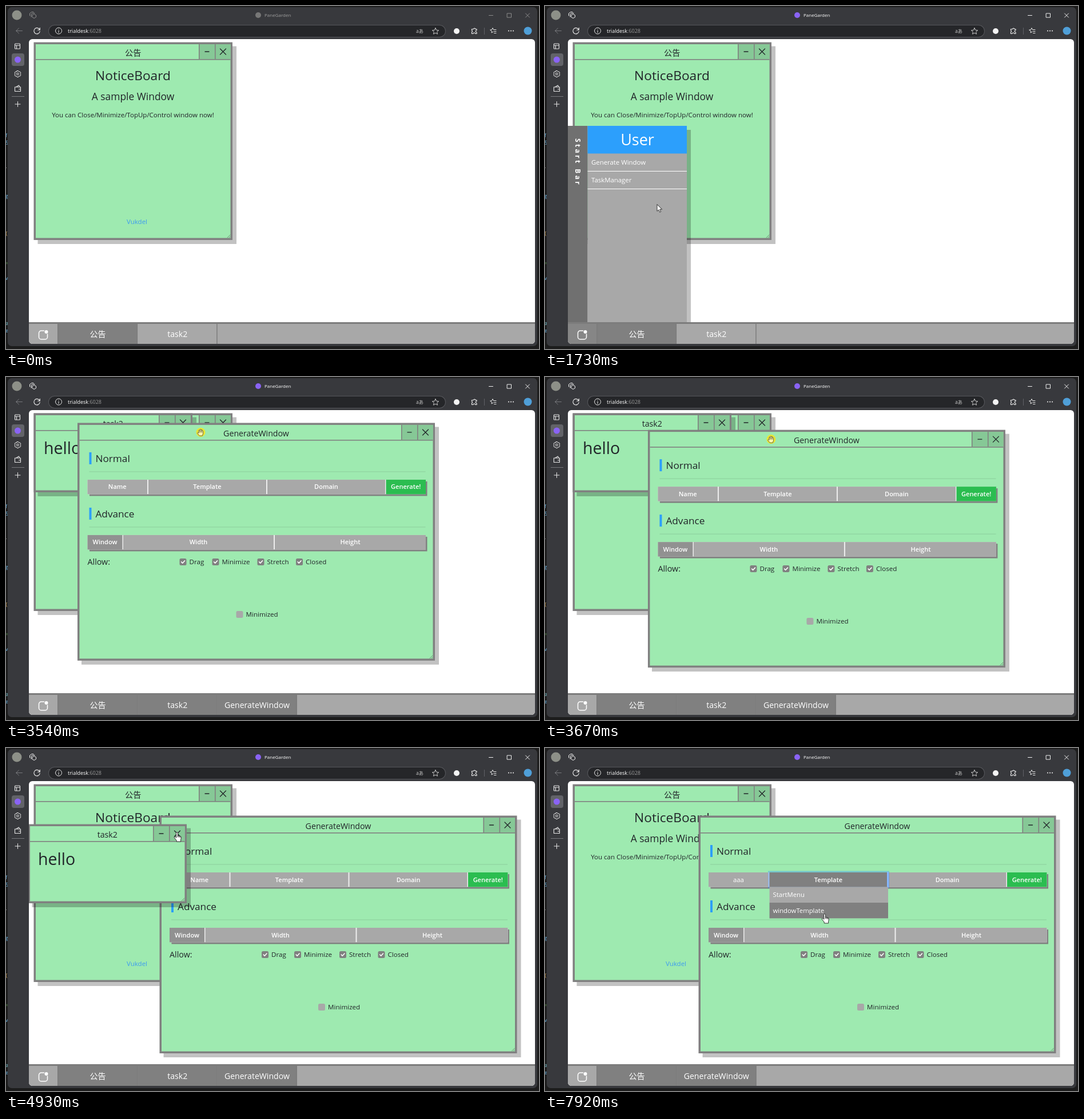
An HTML page with a canvas for the animation above (8000 ms loop, 932 by 601 pixels).

```html
<!DOCTYPE html>
<html lang="en">
<head>
<meta charset="utf-8">
<style>
html, body { margin: 0; width: 100%; height: 100%; overflow: hidden; background: #1c1c1c; }
canvas { display: block; }
</style>
</head>
<body>
<canvas id="stage" width="932" height="601"></canvas>
<script>
const ctx = document.getElementById('stage').getContext('2d');
const LOOP = 8000;
const SANS = '"Open Sans", "Noto Sans CJK SC", "Noto Sans CJK", sans-serif';
const GREEN = '#9eeab0', DARK = '#808080', GREY = '#a8a8a8', BLUE = '#2c9ffc';
const INK = '#212529', SHADE = 'rgba(0,0,0,.24)', CHROME = '#38393d';

// Key moments in ms
const MENU_OPEN = 990, MENU_CLICK = 2080, TASK_CLICK = 2890, TASK_CLOSE = 4970;
const NAME_FOCUS = 5500, LIST_OPEN = 7000;

// Pointer track: time, x, y, shape used from that time on
const track = [
  [130, 918, 585, 'arrow'], [250, 800, 540, 'arrow'], [500, 500, 508, 'arrow'],
  [780, 240, 558, 'hand'], [900, 88, 572, 'hand'], [960, 66, 570, 'hand'],
  [1060, 66, 570, 'hand'], [1250, 150, 400, 'arrow'], [1400, 221, 268, 'hand'],
  [1560, 221, 268, 'hand'], [1640, 208, 315, 'arrow'], [1710, 196, 348, 'arrow'],
  [1760, 196, 348, 'arrow'], [1830, 172, 288, 'hand'], [1890, 160, 268, 'hand'],
  [2080, 160, 268, 'arrow'], [2540, 262, 558, 'hand'], [2630, 285, 566, 'hand'],
  [2820, 290, 579, 'hand'], [2920, 290, 579, 'arrow'], [3300, 264, 80, 'arrow'],
  [3360, 264, 80, 'grab'], [3670, 395, 109, 'grab'], [3880, 484, 135, 'arrow'],
  [4180, 214, 93, 'grab'], [4230, 214, 93, 'grab'], [4280, 212, 98, 'grab'],
  [4480, 204, 163, 'grab'], [4520, 204, 163, 'arrow'], [4800, 299, 148, 'hand'],
  [5050, 299, 148, 'arrow'], [5340, 300, 219, 'beam'], [5480, 338, 230, 'beam'],
  [5600, 338, 230, 'beam'], [5850, 400, 231, 'beam'], [6600, 400, 231, 'beam'],
  [6950, 490, 232, 'beam'], [7360, 490, 232, 'beam'], [7480, 490, 246, 'hand'],
  [7920, 489, 291, 'hand']
];

const clamp = (v, a, b) => Math.min(b, Math.max(a, v));

function pointer(t) {
  let i = track.length - 1;
  while (i > 0 && track[i][0] > t) i--;
  const a = track[i], b = track[i + 1] || a;
  const k = b === a ? 0 : clamp((t - a[0]) / (b[0] - a[0]), 0, 1);
  return { x: a[1] + (b[1] - a[1]) * k, y: a[2] + (b[2] - a[2]) * k, shape: a[3] };
}

function rect(x, y, w, h, fill) {
  ctx.fillStyle = fill;
  ctx.fillRect(x, y, w, h);
}

function round(x, y, w, h, r, fill) {
  ctx.beginPath();
  ctx.roundRect(x, y, w, h, r);
  ctx.fillStyle = fill;
  ctx.fill();
}

function dot(x, y, r, fill) {
  ctx.beginPath();
  ctx.arc(x, y, r, 0, 7);
  ctx.fillStyle = fill;
  ctx.fill();
}

function text(s, x, y, size, color = INK, align = 'left', weight = 400) {
  ctx.font = `${weight} ${size}px ${SANS}`;
  ctx.textAlign = align;
  ctx.fillStyle = color;
  ctx.fillText(s, x, y);
}

function icon(x, y, d, stroke, width = 1, fill) {
  const p = new Path2D(d);
  ctx.save();
  ctx.translate(x, y);
  ctx.lineJoin = ctx.lineCap = 'round';
  if (fill) { ctx.fillStyle = fill; ctx.fill(p); }
  if (stroke) { ctx.strokeStyle = stroke; ctx.lineWidth = width; ctx.stroke(p); }
  ctx.restore();
}

const CROSS = 'M-5-5L5 5M5-5L-5 5';
const STAR = 'M0-5.5L1.7-1.8 5.6-1.4 2.7 1.3 3.5 5.2 0 3.2-3.5 5.2-2.7 1.3-5.6-1.4-1.7-1.8Z';

function browser(active) {
  const lit = active ? '#f0f0f0' : '#8c8c8c', w = '#e6e6e6';
  rect(0, 0, 932, 601, '#1c1c1c');
  [['f', 230, '#6cb8e8'], ['5', 243, '#6cb8e8'], ['.', 284, '#ccc'], ['g', 336, '#6cb8e8'],
   ['{', 402, '#d9a860'], ['=', 454, '#5d9a50'], ['v', 480, '#6cb8e8'],
   ['a', 559, '#7ccbd8'], ['e', 572, '#6cb8e8']].forEach(([s, y, c]) => text(s, -1, y, 9, c));
  round(3, 2, 926, 594, 7, CHROME);

  // Title row
  dot(19, 16, 8.5, '#8d9088');
  icon(47, 16, 'M-5.5 1V-3L-2-5.5H1M-3 3V-1.5L0-3.5H3M-1 0L2-2 5.5 0V3.5L2 5.5-1 3.5Z', lit);
  dot(441, 16, 5, active ? '#8a63f5' : '#777');
  text('PaneGarden', 452, 19, 8, active ? '#fff' : '#a0a0a0');
  icon(848, 16.5, 'M-3.5 0H3.5', lit);
  icon(880, 16.5, 'M-3.5-3.5H3.5V3.5H-3.5Z', lit);
  icon(912, 16.5, 'M-3.5-3.5L3.5 3.5M3.5-3.5L-3.5 3.5', lit);

  // Address row
  icon(23, 43.5, 'M5.5 0H-5.5M-.5-4.5L-5.5 0-.5 4.5', '#77787c');
  icon(54, 43.5, 'M5-1.5A5.2 5.2 0 1 0 5.2 1M5.3-5.2V-1.5H1.6', w, 1.2);
  round(74, 33, 695, 22, 11, '#55565a');
  round(75, 34, 693, 20, 10, '#252629');
  icon(92, 43.5, 'M-5.5 0A5.5 5.5 0 1 1 5.5 0A5.5 5.5 0 1 1-5.5 0M0-.5V3M0-2.6V-2.5', w);
  text('trialdesk', 108, 47, 9, '#fff');
  const hostWidth = ctx.measureText('trialdesk').width;
  text(':6028', 108 + hostWidth, 47, 9, '#9a9a9a');
  text('aあ', 723.5, 47, 8.5, '#c8c8c8', 'center');
  icon(751, 44, STAR, '#c8c8c8');
  dot(788, 44, 5, '#f4f4f4');
  icon(819, 44, 'M-4.5-3.5H-1.5A1.8 1.8 0 0 1 2-3.5H4V-1.5A1.6 1.6 0 0 0 4 2V4.5H1.5A1.7 1.7 0 0 0-2 4.5H-4.5V1.7A1.7 1.7 0 0 0-4.5-1.4Z', w, 1.2);
  rect(836, 38, 1, 12, '#606166');
  icon(851, 43, 'M1 2L-2 4-1.5 1-4.5-1-1.5-1.5 0-4.5 1.5-1.5H6M2.5 1.5H6M2.5 4.5H6', w);
  [-4, 0, 4].forEach(d => dot(883 + d, 43.5, 1.1, w));
  dot(912.5, 43.5, 7, '#4f9fd8');

  // Side column
  icon(20, 70.5, 'M-4.5-3.5A1 1 0 0 1-3.5-4.5H3.5A1 1 0 0 1 4.5-3.5V3.5A1 1 0 0 1 3.5 4.5H-3.5A1 1 0 0 1-4.5 3.5ZM-1.5-1.5V4.5M-4.5-1.5H4.5', w, 1.1);
  round(10, 83, 22, 22, 4, '#626368');
  dot(20.5, 94, 5.5, '#8a63f5');
  icon(20.5, 119, 'M-1.2-5.5H1.2L2-3.8 4-4 5.4-1.8 4.4 0 5.4 1.8 4 4 2 3.8 1.2 5.5H-1.2L-2 3.8-4 4-5.4 1.8-4.4 0-5.4-1.8-4-4-2-3.8ZM-1.8 0A1.8 1.8 0 1 1 1.8 0A1.8 1.8 0 1 1-1.8 0', w);
  icon(20.5, 144.5, 'M-5-2.5H5V5H-5ZM-3-2.5L2-5.5 3.5-2.5M2 1.2H5', w, 1.1);
  rect(10, 158, 22, 1, '#77787c');
  icon(20.5, 172, 'M-4.5 0H4.5M0-4.5V4.5', w);

  round(40, 58, 885, 534, 6, '#fff');
}

function frame(w, h, title) {
  const x = 48.5, y = 63.5, right = x + w;
  rect(x + 7, y + 7, w, h, SHADE);
  rect(x, y, w, h, DARK);
  rect(x + 3.5, y + 3.5, w - 7, h - 7, GREEN);
  rect(right - 59, y + 3.5, 55.5, 26, '#86c896');
  rect(x + 3.5, y + 29.5, w - 7, 1.6, DARK);
  rect(right - 59, y + 3.5, 1.6, 26, DARK);
  rect(right - 31, y + 3.5, 1.6, 26, DARK);
  icon(right - 44.5, y + 16.5, 'M-3.5 0H3.5', INK, 1.3);
  icon(right - 16.5, y + 16.5, CROSS, INK, 1.3);
  text(title, x + w / 2, y + 23.5, 14.2, INK, 'center');
  icon(right - 4, y + h - 4, 'M-5 0L0-5M-2 0L0-2', '#5f7f68', .8);
}

function notice() {
  frame(347.5, 346.5, '公告');
  text('NoticeBoard', 222, 130, 22.7, INK, 'center');
  text('A sample Window', 222, 165, 17.4, INK, 'center');
  text('You can Close/Minimize/TopUp/Control window now!', 222, 195, 11.53, INK, 'center');
  text('Vukdel', 229, 382, 11.5, '#3d9bf0', 'center');
}

function hello() {
  frame(277.5, 138.5, 'task2');
  text('hello', 66, 135, 28.5);
}

function heading(s, y) {
  rect(69, y - 17, 4, 21, BLUE);
  text(s, 80, y, 17.2);
  rect(69, y + 16.5, 588, 1, 'rgba(33,37,41,.14)');
}

function cell(s, x, w, y, fill = GREY) {
  rect(x, y, w, 25.5, fill);
  if (s) text(s, x + w / 2, y + 16.5, 11, '#fff', 'center', 600);
}

function rowBase(y) {
  rect(69.5, y + 3, 590.5, 25.5, DARK);
  rect(66, y, 591.5, 25.5, '#eee');
}

function focusRing(x, y, w) {
  rect(x - 2.5, y - 2.5, w + 5, 30.5, 'rgba(40,130,255,.35)');
  rect(x, y, w, 25.5, DARK);
  rect(x + w - 1.5, y - 1, 3, 27.5, '#86b7fe');
}

function check(label, x, y, on) {
  round(x, y, 12, 12, 2.5, on ? DARK : GREY);
  if (on) icon(x + 6, y + 6, 'M-2.8 0L-.8 2.2 3-2', '#fff', 1.6);
  text(label, x + 17, y + 10, 11.6);
}

function generator(t, mouse) {
  frame(625, 416.5, 'GenerateWindow');
  const typed = t < 6150 ? '' : t < 6310 ? 'a' : t < 6480 ? 'aa' : 'aaa';
  const onName = t >= NAME_FOCUS && t < LIST_OPEN, onList = t >= LIST_OPEN;

  heading('Normal', 132);
  rowBase(163);
  cell(typed ? '' : 'Name', 66, 104.5, 163);
  cell('Template', 172.5, 206, 163);
  cell('Domain', 380.5, 206, 163);
  cell('Generate!', 588, 69.5, 163, '#2bbd50');
  if (onName) {
    focusRing(66, 163, 105.5);
    if (!typed) text('Name', 118.3, 179.5, 11, '#fff', 'center', 600);
  }
  if (typed) {
    text(typed, 118.3, 179.5, 11.3, '#fff', 'center', 500);
    if (onName) rect(118.8 + ctx.measureText(typed).width / 2, 169, 1, 13, '#fff');
  }

  heading('Advance', 229);
  rowBase(260);
  cell('Window', 66, 61, 260, '#919191');
  cell('Width', 128.5, 263, 260);
  cell('Height', 393.5, 264, 260);

  text('Allow:', 66, 312, 14.3);
  check('Drag', 227, 301, true);
  check('Minimize', 284, 301, true);
  check('Stretch', 363, 301, true);
  check('Closed', 430.5, 301, true);
  check('Minimized', 326, 393, false);

  if (onList) {
    focusRing(172.5, 163, 207);
    text('Template', 275.5, 179.5, 11, '#fff', 'center', 600);
    ['StartMenu', 'windowTemplate'].forEach((s, i) => {
      const y = 188.5 + i * 27.5;
      const over = mouse.y - 55 >= y && mouse.y - 55 < y + 27.5;
      rect(172.5, y, 207.5, 27.5, over ? DARK : GREY);
      text(s, 178.5, y + 17.5, 11.3, '#fff', 'left', 500);
    });
  }
}

function at(dx, dy, draw) {
  ctx.save();
  ctx.translate(dx, dy);
  draw();
  ctx.restore();
}

function taskbar(t) {
  const menu = t >= MENU_OPEN && t < MENU_CLICK;
  ctx.save();
  ctx.beginPath();
  ctx.roundRect(40, 554, 885, 38, [0, 0, 6, 6]);
  ctx.clip();
  rect(40, 554, 885, 38, GREY);
  rect(40, 554, 885, 3, '#7c7c7c');
  if (menu || (t > 930 && t < MENU_OPEN)) rect(40, 557, 51, 35, '#868686');
  const hover = clamp((t - 2590) / 220, 0, 1);
  const mix = Math.round(168 - 40 * hover);
  const tasks = [['公告', DARK]];
  if (t < TASK_CLOSE) tasks.push(['task2', `rgb(${mix},${mix},${mix})`]);
  if (t >= MENU_CLICK) tasks.push(['GenerateWindow', DARK]);
  tasks.forEach(([s, fill], i) => {
    const x = 91 + i * 139.2;
    rect(x, 557, 139.2, 35, fill);
    rect(x + 138, 557, 1.4, 35, '#7a7a7a');
    text(s, x + 69.5, 579.5, 14.1, '#fff', 'center', 500);
  });
  rect(90, 557, 1.4, 35, '#7a7a7a');
  icon(65, 576, 'M1.5-7H-3.5A4 4 0 0 0-7.5-3V4A4 4 0 0 0-3.5 8H3.5A4 4 0 0 0 7.5 4V-1', '#fff', 1.5);
  dot(70.5, 571, 3, '#fff');
  ctx.restore();
}

function startMenu(mouse) {
  rect(47, 217, 208, 337, SHADE);
  rect(40, 210, 34.5, 344, '#707070');
  rect(74.5, 210, 173.5, 344, GREY);
  rect(74.5, 210, 173.5, 48.5, BLUE);
  text('User', 161.5, 244, 27, '#fff', 'center');
  ['Generate Window', 'TaskManager'].forEach((s, i) => {
    const y = 259 + i * 31;
    if (mouse.x > 74 && mouse.x < 248 && mouse.y > y && mouse.y < y + 30) rect(74.5, y, 173.5, 30, '#8c8c8c');
    text(s, 81, y + 19, 11.4, '#fff', 'left', 500);
    rect(74.5, y + 30, 173.5, 1, '#fff');
  });
  ctx.save();
  ctx.translate(53, 232);
  ctx.rotate(Math.PI / 2);
  ctx.letterSpacing = '3.4px';
  text('Start Bar', 0, 0, 12, '#fff', 'left', 700);
  ctx.restore();
}

function drawPointer({ x, y, shape }) {
  if (shape === 'arrow') {
    icon(x, y, 'M0 0V11.5L2.7 9 4.6 13.3 6.6 12.4 4.7 8.2H8.2Z', '#222', .9, '#fff');
  } else if (shape === 'hand') {
    icon(x, y, 'M-1.4 1A1.4 1.4 0 0 1 1.4 1V5.5L6 6.6Q7.6 7 7.4 9L6.6 13V16H-.8V14L-4.6 9.2Q-5.2 7.2-3.4 7.4L-1.4 9ZM1.4 5.5V8M3.7 6.2V8.4M5.8 6.8V8.8', '#222', .9, '#fff');
  } else if (shape === 'grab') {
    dot(x, y, 8, 'rgba(240,228,40,.9)');
    icon(x, y, 'M-3.6 1V-3.2Q-2.7-4.6-1.8-3.2V-4.6Q-.8-6 .2-4.6Q1.2-5.6 2.1-4V-3Q3.2-4 4.1-2.4V2.2L2.8 6H-2.2L-6 1.4Q-5.6-.4-3.6 1M-1.8-3.2V0M.2-4.6V0M2.1-4V0', '#4c4820', .8, '#fff8b0');
  } else {
    icon(x, y, 'M-2.5-6H-.6L0-5.4 .6-6H2.5M0-5.4V5.4M-2.5 6H-.6L0 5.4 .6 6H2.5', '#444', 1);
  }
}

function draw(t) {
  const mouse = pointer(t);
  browser(t >= 960);
  ctx.save();
  ctx.beginPath();
  ctx.rect(40, 58, 885, 496);
  ctx.clip();
  notice();

  const g = pointer(clamp(t, 3360, 3880)), h = pointer(clamp(t, 4230, 4480));
  const showGen = () => t >= MENU_CLICK && at(g.x - 264, g.y - 80, () => generator(t, mouse));
  const showHello = () => t >= TASK_CLICK && t < TASK_CLOSE && at(h.x - 214, h.y - 93, hello);
  // A grabbed window comes to the front
  (t < 4200 ? [showHello, showGen] : [showGen, showHello]).forEach(show => show());

  if (t >= MENU_OPEN && t < MENU_CLICK) startMenu(mouse);
  ctx.restore();
  taskbar(t);
  if (t >= 130) drawPointer(mouse);
}

const start = performance.now();
function tick() {
  draw((performance.now() - start) % LOOP);
  requestAnimationFrame(tick);
}
tick();
</script>
</body>
</html>
```
